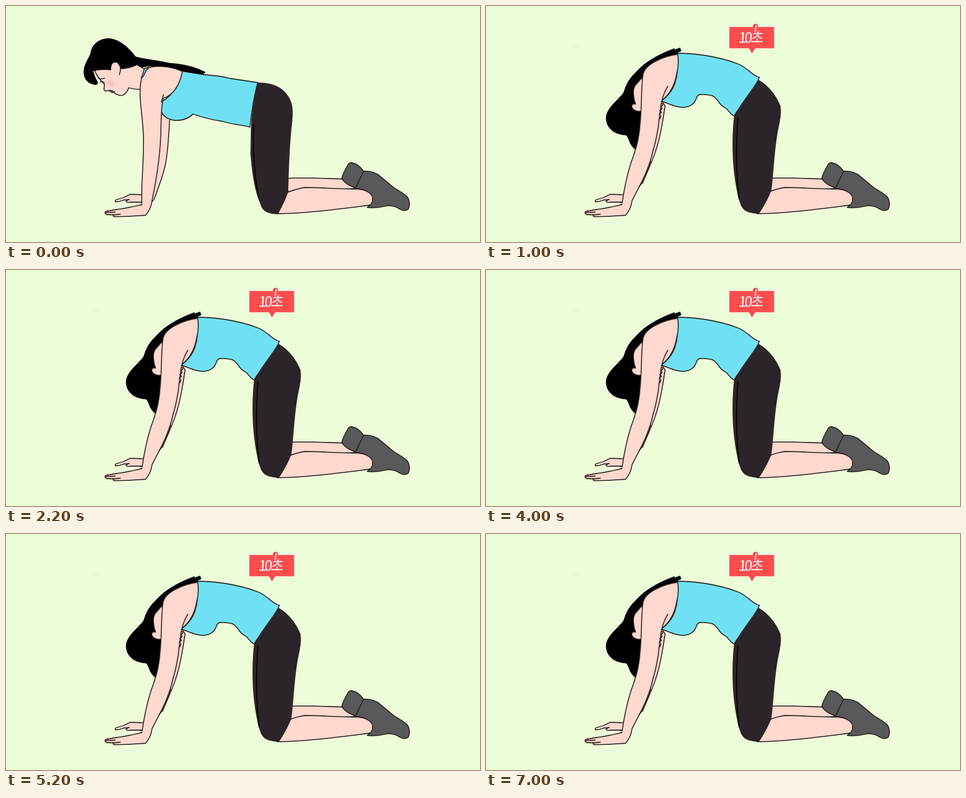
An HTML page for the animation above (8000 ms loop, 900 px wide and 450 px high).

```html
<!DOCTYPE html>
<html lang="ko">
<head>
<meta charset="utf-8">
<style>
  html, body { margin: 0; width: 100%; height: 100%; overflow: hidden; background: #edfcd9; }
  svg { display: block; width: 100vw; height: 100vh; }
  path { stroke: #2c2624; stroke-width: 1.8; stroke-linejoin: round; stroke-linecap: round; fill: none; }
  .skin { fill: #ffd8ce; }
  .top { fill: #70e1f5; }
  .pants { fill: #2b2529; }
  .seam { stroke: #000; }
  .sock { fill: #595959; }
  .hair { fill: #000; stroke: #000; stroke-width: 1; }
  .bare { stroke: none; }
  .tag { fill: #ff4d4f; stroke: none; }
  text { font: 300 27px "Noto Sans CJK KR", "Noto Sans CJK", sans-serif; fill: #fff; }
</style>
</head>
<body>
<svg viewBox="0 0 900 450">
  <!-- lower legs, socks and far hand -->
  <path class="skin" d="M530 329C565 326 605 329 642 330L664 348L530 354Z"/>
  <path class="skin" d="M530 357Q550 349 567 346C595 346 630 349 668 349L690 352L696 362V379C640 386 570 396 514 396Z"/>
  <path class="sock" d="M657 299C650 297 647 307 643 315Q638 324 638 329Q644 340 664 347L679 315Q669 301 657 299Z"/>
  <path class="sock" d="M679 315L664 347Q690 352 695 362Q700 375 686 384Q705 386 722 381Q738 380 747 387Q757 393 764 387Q769 376 762 364Q752 355 737 347Q718 331 706 321Q692 314 679 315Z"/>
  <path class="skin" d="M262 360L236 359Q228 363 221 366L210 369Q206 371 208 373.500Q217 373 224 370L234 369L228 372Q229 376 235 374L262 374"/>

  <g id="flat">
    <path class="skin" d="M295 200L311 214C309 240 308 280 302 305C296 330 288 350 281 369L275 376"/>
    <path class="pants" d="M478 147C505 147 523 154 535 172C545 187 545 203 541 235C537 275 536 310 535 354C530 370 522 384 516 396C504 396 491 393 486 383L481 370C473 350 468 320 465 282L466 230C468 205 470 175 478 147Z"/>
    <path class="seam" d="M470 226C468 275 472 330 481 370"/>
    <path class="skin" d="M168 120C170 132 180 142 187 150L186 159Q187 164 195 161Q199 163 201 165L206 164Q206 168 210 168Q216 172 222 170Q230 165 233 156Q243 159 256 159L264 122L250 110L210 95Z"/>
    <circle cx="199" cy="147" r="6.5" fill="#fbc5bf"/>
    <path d="M175 137Q179 140 187 138M179 145Q183 142 187 147M196 161Q202 161 206 165"/>
    <path class="top" d="M335 124L376 131C400 133 410 134 425 138L478 146C470 175 466 205 463 231C445 226 430 226 411 220C390 217 375 213 355 206C347 214 336 219 320 218C305 216 296 208 294 198L296 182C315 172 328 150 335 124Z"/>
    <path class="skin" d="M258 379C256 340 262 300 261 250C260 210 251 175 256 145Q258 130 267 119C280 113 315 113 335 125C330 150 318 170 299 176C296 185 295 195 294 240C293 280 288 320 277 372"/>
    <path d="M295 183Q297 176 299 169"/>
    <path class="top" d="M272 117L263 119L257 137L261 134Q264 124 272 117Z"/>
    <path class="hair" d="M170 150C153 148 147 137 148 122C150 108 158 99 161 90C163 73 177 62 196 62C215 64 232 78 246 97C265 102 290 104 310 109C340 111 360 117 378 126Q378 129 372 130L345 126L325 121C305 114 280 112 256 117L249 112C240 117 230 119 217 120L198 122C187 120 172 122 165 124Q168 135 174 146Q174 150 170 150Z"/>
    <path class="skin bare" d="M200 126C197 110 205 105 212 109C219 114 218 124 215 131Z"/>
    <path d="M213 110C219 115 218 124 215 131"/>
  </g>

  <g id="arched">
    <path d="M166 78H175" style="stroke:#dce8d2;stroke-width:1.2"/>
    <path class="skin" d="M330 176L340 190C335 225 330 255 320 283Q310 310 297 337L286 350"/>
    <path d="M312 296L297 337" style="stroke-width:3"/>
    <path class="pants" d="M518 142C535 152 550 170 558 190C561 205 557 220 553 240C546 280 546 310 541 352Q532 374 518 395C505 395 490 393 485 380L480 366C472 330 469 300 469 270C469 245 470 225 472 210C487 182 500 160 518 142Z"/>
    <path class="seam" d="M478 214C475 265 474 320 481 368"/>
    <path class="hair" d="M368 80L357 84L358 81L343 87C325 95 303 106 286 125C265 145 265 158 261 166C250 180 229 195 228 213C229 235 245 245 266 246C273 252 271 266 286 275L298 215L300 130C310 110 335 95 365 91L364 88L370 86Z"/>
    <path class="skin" d="M297 136L283 152Q279 160 280 165Q280 176 284 187Q275 186 277 193Q280 200 291 201L297 201Z"/>
    <path class="top" d="M364 90C410 90 455 101 480 111C500 121 506 133 519 136C515 150 490 178 471 210C460 203 462 198 452 193C440 185 443 182 438 178C430 168 425 171 419 169C405 168 403 168 400 174C396 188 385 194 370 193C355 191 345 186 333 181C355 166 362 145 364 118Z"/>
    <path class="skin" d="M258 379C262 350 267 325 275 300C284 275 291 255 293 220C296 190 294 160 298 132C300 112 335 96 364 92Q367 110 362 130C358 152 349 168 334 180C329 200 329 240 318 272C308 320 287 350 277 372"/>
    <path d="M334 180Q338 165 345 153"/>
    <path d="M333 185Q339 188 332 192Q337 196 330 199Q336 203 329 206Q335 211 328 217"/>
    <path class="tag" d="M462 40H547V80.500H511L505 90.500L499 80.500H462Z"/>
    <circle class="tag" cx="511.500" cy="39" r="5"/>
    <path d="M513 38L511 48" style="stroke:#fff;stroke-width:2"/>
    <text x="486 497 509" y="70" transform="skewX(-6)">10초</text>
  </g>

  <!-- near hand -->
  <path class="skin" d="M277 372C276 384 270 393 265 399C240 401 215 402 205 401.500Q201 400 206 398L192 398Q185 394 190 391.500L210 388C225 387 240 382 258 379"/>
  <path d="M190 394L207 393M206 398L217 397"/>
  <path d="M260 377.500L275 372.500" style="stroke:#ffd8ce;stroke-width:3"/>
</svg>
<script>
  const flat = document.getElementById("flat");
  const arched = document.getElementById("arched");
  const LOOP = 8000, CYCLE = 3000, REST = 1000;

  function draw(now) {
    const isArched = (now % LOOP) % CYCLE >= REST;
    flat.style.display = isArched ? "none" : "";
    arched.style.display = isArched ? "" : "none";
    requestAnimationFrame(draw);
  }
  draw(performance.now());
</script>
</body>
</html>
```
